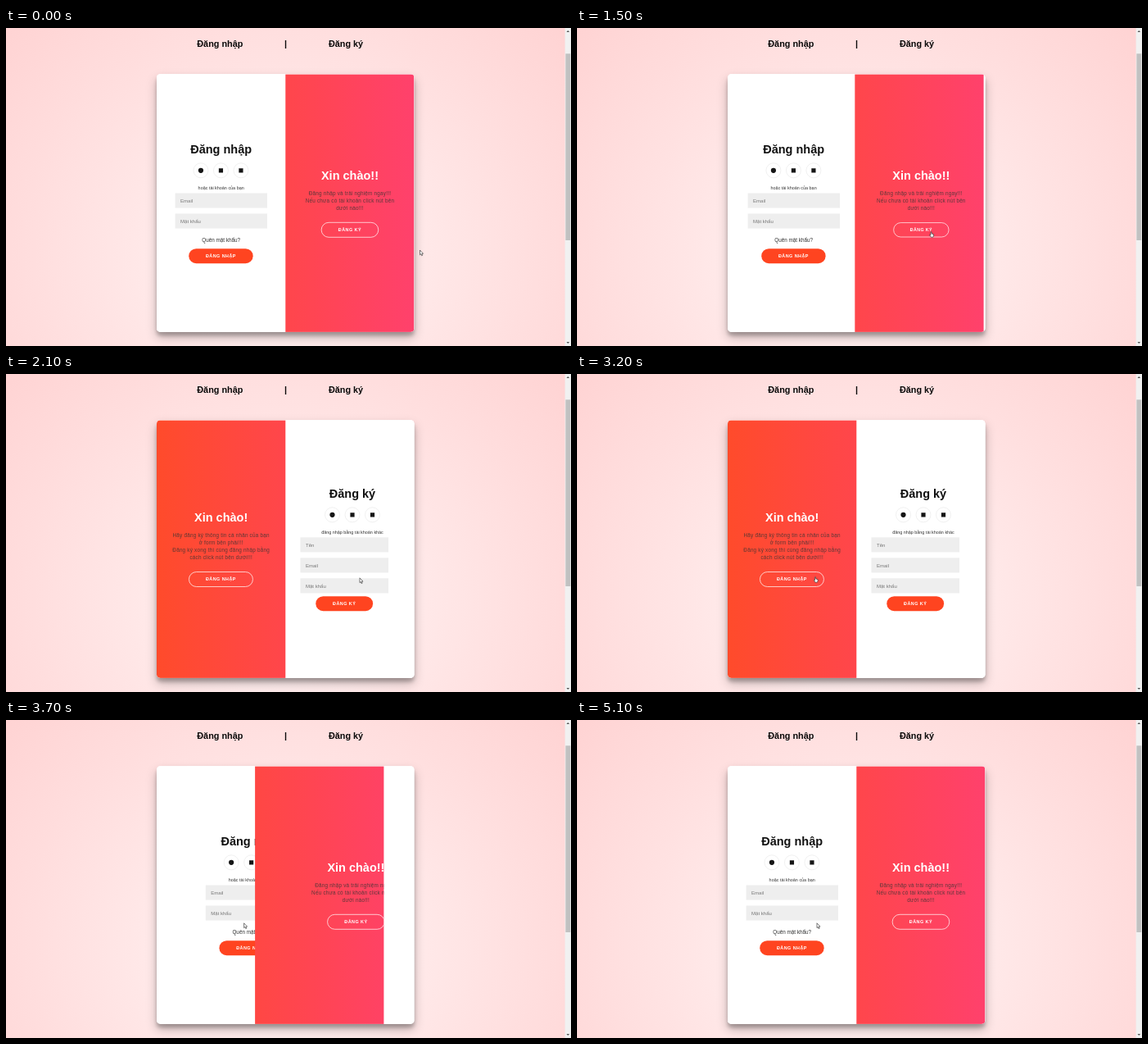
Write an HTML page with a canvas that moves like this. It is 690 px wide and 388 px high and loops after 5200 ms.

```html
<!DOCTYPE html>
<html lang="vi">
<head>
<meta charset="utf-8">
<title>Đăng nhập / Đăng ký</title>
<style>
  html, body { margin: 0; width: 100%; height: 100%; overflow: hidden; background: #ffe4e4; }
  canvas { display: block; width: 690px; height: 388px; }
</style>
</head>
<body>
<canvas id="stage"></canvas>
<script>
const STAGE_W = 690, STAGE_H = 388;
const LOOP = 5200, STEP = 100, SLIDE = 600;
const OPEN_AT = 1452, CLOSE_AT = 3302;

// Card geometry; S is the zoom of the page's CSS pixels.
const S = 0.453;
const CARD = { x: 184, y: 56.3, w: 314.6, h: 314.6 };
const HALF = CARD.w / 2;
const MID = CARD.x + HALF;
const LEFT_C = CARD.x + HALF / 2;
const RIGHT_C = MID + HALF / 2;
const SANS = '"Liberation Sans", Arial, sans-serif';

const canvas = document.getElementById('stage');
const ctx = canvas.getContext('2d');
const dpr = window.devicePixelRatio || 1;
canvas.width = STAGE_W * dpr;
canvas.height = STAGE_H * dpr;

const clamp = v => Math.min(1, Math.max(0, v));
const lerp = (a, b, k) => a + (b - a) * k;

// cubic-bezier(.42, 0, .58, 1)
function easeInOut(x) {
  if (x <= 0 || x >= 1) return clamp(x);
  let lo = 0, hi = 1, u = x;
  for (let i = 0; i < 30; i++) {
    u = (lo + hi) / 2;
    const bx = 3 * (1 - u) * (1 - u) * u * 0.42 + 3 * (1 - u) * u * u * 0.58 + u * u * u;
    if (bx < x) lo = u; else hi = u;
  }
  return 3 * (1 - u) * u * u + u * u * u;
}

function text(str, x, y, size, { color = '#333', bold = false, align = 'center', spacing = 0 } = {}) {
  ctx.font = `${bold ? 'bold ' : ''}${size}px ${SANS}`;
  ctx.letterSpacing = spacing + 'px';
  ctx.textAlign = align;
  ctx.fillStyle = color;
  ctx.fillText(str, x, y);
}

function roundRect(x, y, w, h, r) {
  ctx.beginPath();
  ctx.roundRect(x, y, w, h, r);
}

function heading(str, x, y, color = '#111') {
  text(str, x, y, 32 * S, { bold: true, color });
}

function paragraph(lines, x, y) {
  lines.forEach((line, i) =>
    text(line, x, y + i * 20 * S, 14 * S, { color: 'rgba(51,51,51,.8)', spacing: 0.5 * S }));
}

function button(str, x, y, w, { ghost = false, scale = 1 } = {}) {
  const h = 18;
  ctx.save();
  ctx.translate(x, y);
  ctx.scale(scale, scale);
  roundRect(-w / 2, -h / 2, w, h, h / 2);
  if (ghost) {
    ctx.lineWidth = 0.7;
    ctx.strokeStyle = '#fff';
    ctx.stroke();
  } else {
    ctx.fillStyle = '#ff4420';
    ctx.fill();
  }
  text(str, 0, 1.9, 12 * S, { bold: true, color: '#fff', spacing: S });
  ctx.restore();
}

function field(label, x, y, w) {
  ctx.fillStyle = '#eee';
  ctx.fillRect(x, y, w, 18.1);
  text(label, x + 6.5, y + 11.2, 13.33 * S, { color: '#757575', align: 'left' });
}

function socials(x, y) {
  [-24.5, 0, 24.5].forEach((dx, i) => {
    const cx = x + dx;
    ctx.beginPath();
    ctx.arc(cx, y, 9, 0, 2 * Math.PI);
    ctx.lineWidth = 0.45;
    ctx.strokeStyle = '#ddd';
    ctx.stroke();
    ctx.fillStyle = '#151515';
    ctx.beginPath();
    if (i === 0) ctx.arc(cx, y, 3.1, 0, 2 * Math.PI);
    else ctx.rect(cx - 2.6, y - 2.6, 5.2, 5.2);
    ctx.fill();
  });
}

function whiteHalf(x) {
  ctx.fillStyle = '#fff';
  ctx.fillRect(x, CARD.y, HALF, CARD.h);
}

function signInForm(dx) {
  whiteHalf(CARD.x + dx);
  const c = LEFT_C + dx;
  heading('Đăng nhập', c, 152.8);
  socials(c - 0.2, 173.8);
  text('hoặc tài khoản của bạn', c, 197, 12 * S);
  field('Email', 206.6 + dx, 201.5, 112.4);
  field('Mật khẩu', 206.6 + dx, 226.5, 112.4);
  text('Quên mật khẩu?', c, 260.8, 14 * S);
  button('ĐĂNG NHẬP', c - 0.2, 278.2, 78.4);
}

function signUpForm(dx) {
  whiteHalf(CARD.x + dx);
  const c = 265.7 + dx;
  heading('Đăng ký', c, 150.7);
  socials(c, 171.8);
  text('đăng nhập bằng tài khoản khác', c, 194.7, 12 * S);
  ['Tên', 'Email', 'Mật khẩu'].forEach((label, i) =>
    field(label, 202.2 + dx, 199.3 + i * 25, 107.6));
  button('ĐĂNG KÝ', 255.9 + dx, 280.2, 69.8);
}

function overlay(p, pressRight, pressLeft) {
  ctx.save();
  ctx.beginPath();
  ctx.rect(MID - p * HALF, CARD.y, HALF, CARD.h);
  ctx.clip();

  const fill = ctx.createLinearGradient(CARD.x, 0, CARD.x + CARD.w, 0);
  fill.addColorStop(0, '#ff4b2b');
  fill.addColorStop(1, '#ff416c');
  ctx.fillStyle = fill;
  ctx.fillRect(CARD.x, CARD.y, CARD.w, CARD.h);

  const l = LEFT_C - 0.2 * HALF * (1 - p);
  heading('Xin chào!', l, 180.3, '#fff');
  paragraph([
    'Hãy đăng ký thông tin cá nhân của bạn',
    'ở form bên phải!!!',
    'Đăng ký xong thì cùng đăng nhập bằng',
    'cách click nút bên dưới!!!'
  ], l, 199.2);
  button('ĐĂNG NHẬP', l - 0.2, 250.5, 78, { ghost: true, scale: pressLeft });

  const r = RIGHT_C + 0.2 * HALF * p;
  heading('Xin chào!!', r, 185, '#fff');
  paragraph([
    'Đăng nhập và trải nghiệm ngay!!!',
    'Nếu chưa có tài khoản click nút bên',
    'dưới nào!!!'
  ], r, 203.7);
  button('ĐĂNG KÝ', r, 246.3, 69.6, { ghost: true, scale: pressRight });
  ctx.restore();
}

function background() {
  ctx.save();
  ctx.translate(341, 277);
  ctx.scale(482, 447);
  const glow = ctx.createRadialGradient(0, 0, 0, 0, 0, 1);
  glow.addColorStop(0, '#fff5f5');
  glow.addColorStop(1, '#ffd1d1');
  ctx.fillStyle = glow;
  ctx.fillRect(-1, -1, 2, 2);
  ctx.restore();

  const nav = { bold: true, color: '#0a0a0a' };
  text('Đăng nhập', 261.3, 23, 10.85, nav);
  text('|', 341.4, 23, 10.85, nav);
  text('Đăng ký', 415, 23, 10.85, nav);
}

function triangle(x, y, dir) {
  ctx.beginPath();
  ctx.moveTo(x - 1.8, y + dir);
  ctx.lineTo(x + 1.8, y + dir);
  ctx.lineTo(x, y - dir);
  ctx.fill();
}

function scrollbar() {
  ctx.fillStyle = '#f1f1f1';
  ctx.fillRect(682.6, 0, 7.4, STAGE_H);
  ctx.fillStyle = '#c1c1c1';
  ctx.fillRect(683.4, 31.3, 5.9, 227.7);
  ctx.fillStyle = '#505050';
  triangle(686.3, 4, 1);
  triangle(686.3, 384, -1);
}

function cardShadow(offset, blur, alpha) {
  ctx.save();
  ctx.shadowColor = `rgba(0,0,0,${alpha})`;
  ctx.shadowOffsetY = offset * S * dpr;
  ctx.shadowBlur = blur * S * dpr;
  ctx.fillStyle = '#fff';
  roundRect(CARD.x, CARD.y, CARD.w, CARD.h, 4.5);
  ctx.fill();
  ctx.restore();
}

function cursorAt(t) {
  const path = [[300, 505.5, 271], [1000, 432, 248.8], [2200, 432, 248.8],
                [3000, 290.6, 247.8], [4000, 290.6, 247.8], [4600, 293, 247.8]];
  const next = path.findIndex(k => k[0] > t);
  if (next === 0) return path[0].slice(1);
  if (next < 0) return path[path.length - 1].slice(1);
  const a = path[next - 1], b = path[next];
  const k = easeInOut((t - a[0]) / (b[0] - a[0]));
  return [lerp(a[1], b[1], k), lerp(a[2], b[2], k)];
}

// True while the pointer is over the visible part of a ghost button.
function overButton(x, y, p) {
  const left = MID - p * HALF;
  if (x < left || x > left + HALF) return false;
  const hit = (cx, cy, w) => Math.abs(x - cx) < w / 2 && Math.abs(y - cy) < 9;
  return hit(LEFT_C - 0.2 * HALF * (1 - p), 250.5, 78) ||
         hit(RIGHT_C + 0.2 * HALF * p, 246.3, 69.6);
}

function pointer(x, y, hand) {
  const shape = hand
    ? [[0, 0], [1, 0], [1.2, 2.2], [3.6, 2.9], [3.4, 5], [2.8, 6.4], [0.4, 6.4], [-1.4, 3.6], [-0.7, 3.2], [0, 3.9]]
    : [[0, 0], [0, 5.8], [1.3, 4.7], [2.2, 6.8], [3.1, 6.4], [2.3, 4.4], [4, 4.3]];
  ctx.beginPath();
  shape.forEach(([dx, dy]) => ctx.lineTo(x + dx, y + dy));
  ctx.closePath();
  ctx.fillStyle = '#fff';
  ctx.fill();
  ctx.lineWidth = 0.6;
  ctx.strokeStyle = '#222';
  ctx.stroke();
}

// Button shrinks while held and springs back in 80 ms after the click.
function press(t, click) {
  if (t < click - 80 || t > click + 80) return 1;
  return t < click ? 0.95 : lerp(0.95, 1, ((t - click) / 80) ** 2);
}

function draw(t) {
  ctx.setTransform(dpr, 0, 0, dpr, 0, 0);
  background();
  scrollbar();
  cardShadow(14, 28, 0.25);
  cardShadow(10, 10, 0.22);

  const opening = (t - OPEN_AT) / SLIDE;
  const p = easeInOut(opening) - easeInOut((t - CLOSE_AT) / SLIDE);
  const signUpShown = opening >= 0.5 && t < CLOSE_AT;

  ctx.save();
  roundRect(CARD.x, CARD.y, CARD.w, CARD.h, 4.5);
  ctx.clip();
  (signUpShown ? signUpForm : signInForm)(p * HALF);
  overlay(p, press(t, OPEN_AT), press(t, CLOSE_AT));
  ctx.restore();

  const [x, y] = cursorAt(t);
  pointer(x, y, overButton(x, y, p));
}

const start = performance.now();
function tick() {
  const t = (performance.now() - start) % LOOP;
  draw(Math.floor(t / STEP) * STEP);
  requestAnimationFrame(tick);
}
tick();
</script>
</body>
</html>
```
